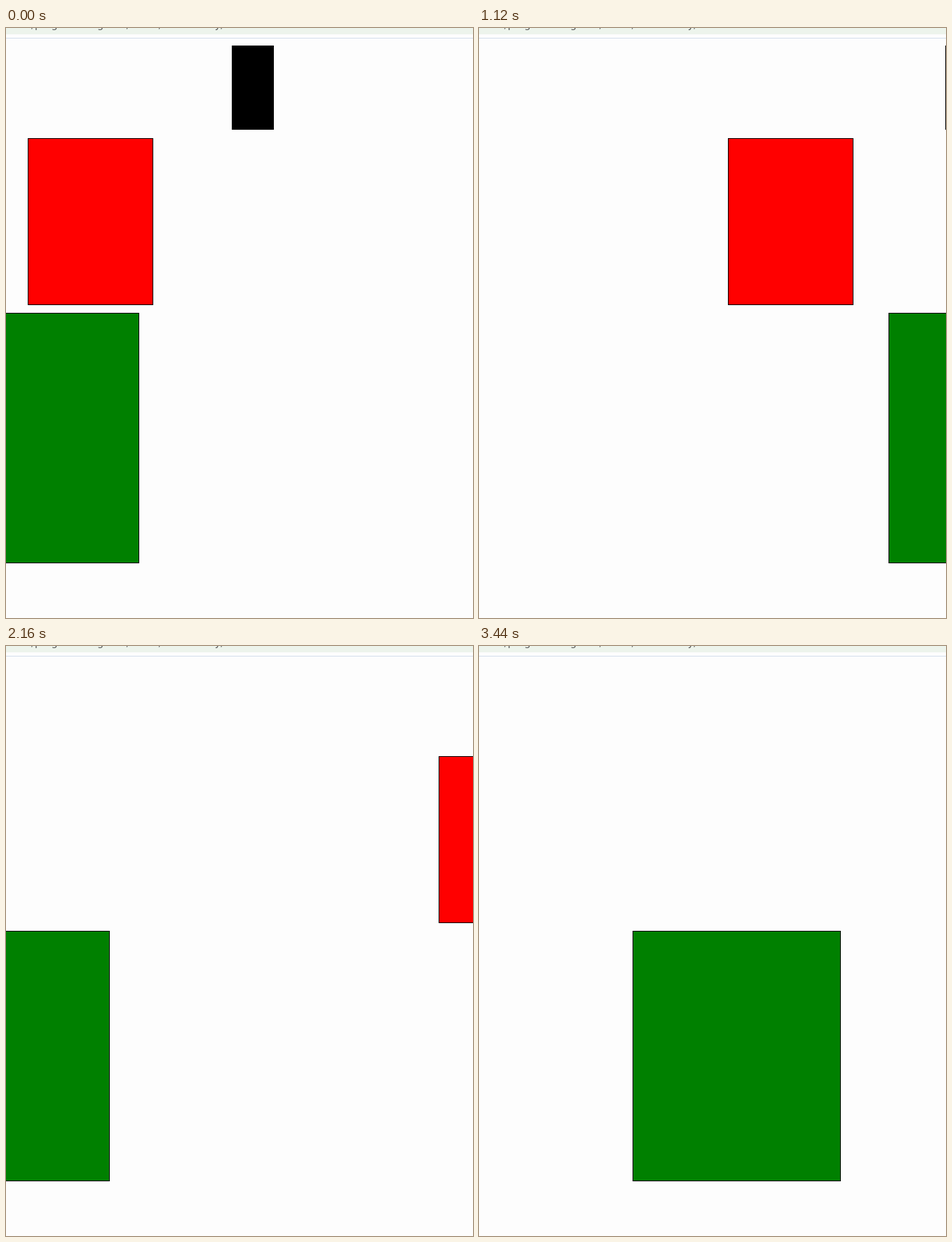
Animation, 666 px wide and 841 px high, one loop 3.52 s. Source, as an HTML page:

```html
<!DOCTYPE html>
<html lang="en">
<head>
<meta charset="utf-8">
<title>Sliding boxes</title>
<style>
  html, body { margin: 0; width: 100%; height: 100%; overflow: hidden; background: #fdfdfd; }
  #stage { position: relative; width: 666px; height: 841px; overflow: hidden; background: #fdfdfd; }
  .bar { position: absolute; left: 0; top: 0; width: 100%; height: 9px; background: #edf4ec; }
  .rule { position: absolute; left: 0; top: 14px; width: 100%; height: 1px; background: #d3deec; }
  svg { position: absolute; left: 0; top: 0; }
  text { font: 14.5px "DejaVu Sans", sans-serif; fill: #555; }
  .box { position: absolute; left: 0; box-sizing: border-box; border: 1px solid #000; }
  #black { top: 25px; width: 60px; height: 120px; background: #000; }
  #red { top: 157px; width: 179px; height: 238px; background: #f00; }
  #green { top: 406px; width: 297px; height: 357px; background: green; }
</style>
</head>
<body>
<div id="stage">
  <div class="bar"></div>
  <div class="rule"></div>
  <svg width="666" height="12"><text x="36" y="0">/programming test/demo/cssmemory/</text></svg>
  <div class="box" id="black"></div>
  <div class="box" id="red"></div>
  <div class="box" id="green"></div>
</div>
<script>
  const LOOP = 3520, STEP = 40;
  const GREEN_START = 580, GREEN_PERIOD = 2010;

  // [time, left] points of each slide
  const redPath = [[0, 31], [840, 275], [1360, 422], [1640, 492], [2160, 617], [2240, 635], [2400, 668]];
  const greenPath = [[460, 700], [500, 640], [660, 422], [780, 285], [850, 219], [1060, 62],
                     [1430, -107], [1580, -149], [1980, -190], [2010, -191]];

  const slope = (a, b) => (b[1] - a[1]) / (b[0] - a[0]);

  // Smooth curve through the points, held at both ends
  function along(path, t) {
    const last = path.length - 1;
    if (t <= path[0][0]) return path[0][1];
    if (t >= path[last][0]) return path[last][1];
    const i = path.findIndex(p => p[0] > t) - 1;
    const a = path[i], b = path[i + 1];
    const tangent = k => slope(path[Math.max(k - 1, 0)], path[Math.min(k + 1, last)]);
    const d = b[0] - a[0], u = (t - a[0]) / d, v = 1 - u;
    return a[1] * v * v * (1 + 2 * u) + b[1] * u * u * (3 - 2 * u)
         + d * u * v * (tangent(i) * v - tangent(i + 1) * u);
  }

  // Decelerates to the right until it has left the stage
  const blackLeft = t => t > 1140 ? 700 : 322 + 0.4601 * t - 0.000137 * t * t;
  const greenLeft = t => along(greenPath, (t - GREEN_START + GREEN_PERIOD) % GREEN_PERIOD);

  const place = (id, x) => {
    document.getElementById(id).style.transform = `translateX(${Math.round(x)}px)`;
  };

  const start = performance.now();
  function draw() {
    const elapsed = Math.max(0, performance.now() - start) % LOOP;
    const t = Math.floor(elapsed / STEP) * STEP;
    place("black", blackLeft(t));
    place("red", along(redPath, t));
    place("green", greenLeft(t));
    requestAnimationFrame(draw);
  }
  draw();
</script>
</body>
</html>
```
